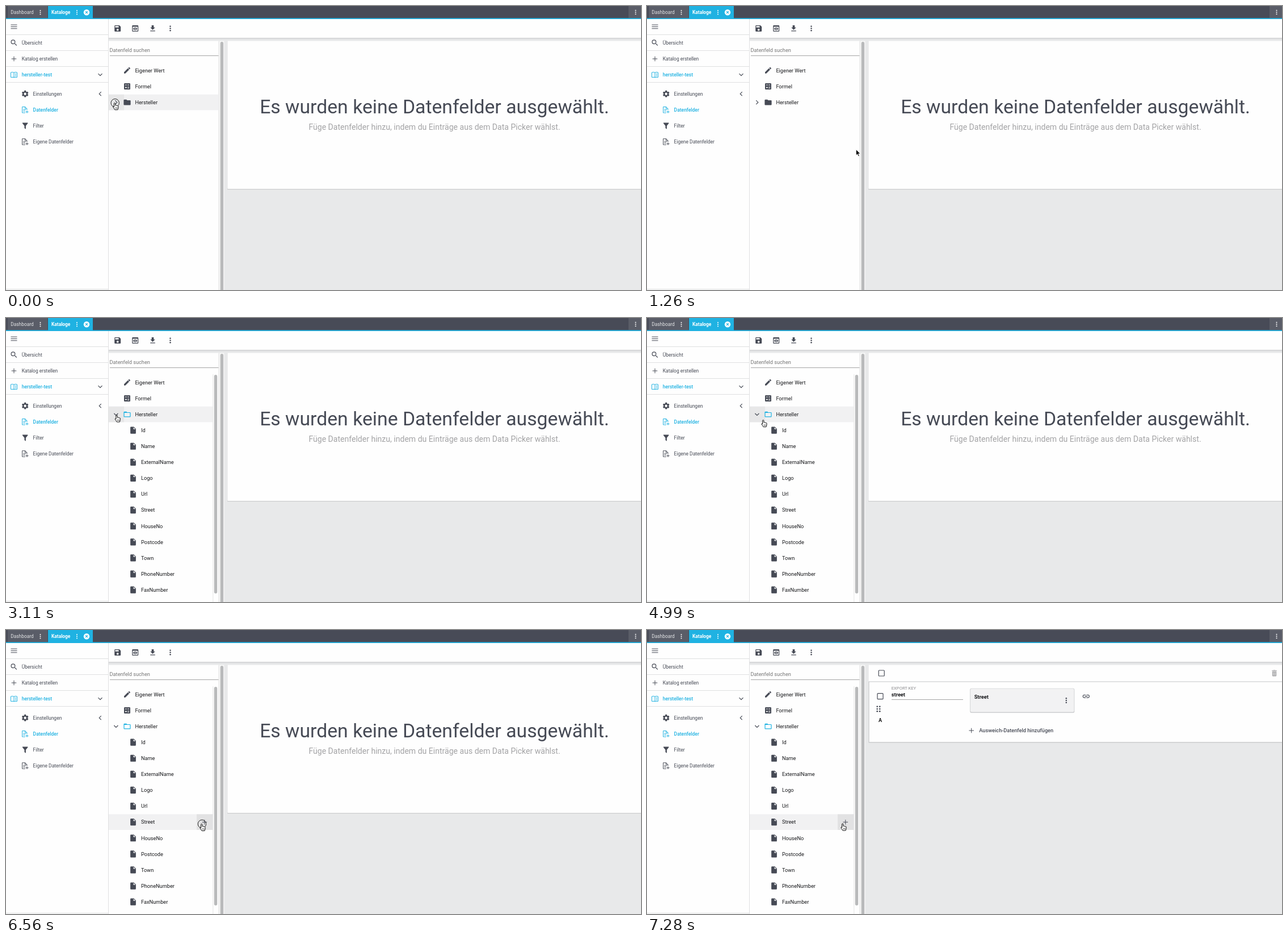
Animation of 1119 by 500 pixels, one loop 8000 ms. Source, as an HTML page:

```html
<!DOCTYPE html>
<html lang="de">
<head>
<meta charset="utf-8">
<title>Datenfelder</title>
<style>
html, body { margin: 0; width: 100%; height: 100%; overflow: hidden; background: #e8e9ea; }
svg { display: block; width: 100vw; height: 100vh; font-family: Roboto, sans-serif; }
</style>
</head>
<body>
<svg id="stage" viewBox="0 0 1119 500"></svg>
<script>
const LOOP = 8000;
const DARK = '#464a55', CYAN = '#1fb2e2', LINE = '#dfe0e1', INK = '#16171a';
const ROW_TOP = 99.3, PITCH = 28.1;
const LEAVES = ['Id', 'Name', 'ExternalName', 'Logo', 'Url', 'Street', 'HouseNo',
  'Postcode', 'Town', 'PhoneNumber', 'FaxNumber'];

// Glyphs on a 24-unit grid
const GLYPH = {
  save: 'M17 3H5a2 2 0 0 0-2 2v14a2 2 0 0 0 2 2h14a2 2 0 0 0 2-2V7zM12 19a3 3 0 1 1 0-6 3 3 0 0 1 0 6zM15 9H5V5h10z',
  preview: 'M19 3H5a2 2 0 0 0-2 2v14a2 2 0 0 0 2 2h14a2 2 0 0 0 2-2V5a2 2 0 0 0-2-2zm0 16H5V7h14zM12 9c-2.73 0-5.06 1.66-6 4 .94 2.34 3.27 4 6 4s5.06-1.66 6-4c-.94-2.34-3.27-4-6-4zm0 6.5a2.5 2.5 0 0 1 0-5 2.5 2.5 0 0 1 0 5zm0-1a1.5 1.5 0 0 0 0-3 1.5 1.5 0 0 0 0 3z',
  download: 'M19 9h-4V3H9v6H5l7 7zM5 18v2h14v-2z',
  search: 'M15.5 14h-.79l-.28-.27A6.47 6.47 0 0 0 16 9.5 6.5 6.5 0 1 0 9.5 16c1.61 0 3.09-.59 4.23-1.57l.27.28v.79l5 4.99L20.49 19zm-6 0a4.5 4.5 0 1 1 0-9 4.5 4.5 0 0 1 0 9z',
  plus: 'M19 12.8h-6.2V19h-1.6v-6.2H5v-1.6h6.2V5h1.6v6.2H19z',
  gear: 'M19.14 12.94a7 7 0 0 0 0-1.88l2.03-1.58a.5.5 0 0 0 .12-.61l-1.92-3.32a.5.5 0 0 0-.59-.22l-2.39.96a7 7 0 0 0-1.62-.94l-.36-2.54a.5.5 0 0 0-.48-.41h-3.84a.5.5 0 0 0-.47.41l-.36 2.54a7 7 0 0 0-1.62.94l-2.39-.96a.5.5 0 0 0-.59.22L2.74 8.87a.5.5 0 0 0 .12.61l2.03 1.58a7 7 0 0 0 0 1.88l-2.03 1.58a.5.5 0 0 0-.12.61l1.92 3.32c.12.22.37.29.59.22l2.39-.96a7 7 0 0 0 1.62.94l.36 2.54c.05.24.24.41.48.41h3.84c.24 0 .44-.17.47-.41l.36-2.54a7 7 0 0 0 1.62-.94l2.39.96c.22.08.47 0 .59-.22l1.92-3.32a.5.5 0 0 0-.12-.61zM12 15.6a3.6 3.6 0 1 1 0-7.2 3.6 3.6 0 0 1 0 7.2z',
  filter: 'M14 12v7.9a1 1 0 0 1-1.7.8l-2-2a1 1 0 0 1-.3-.8V12L4.2 4.6A1 1 0 0 1 5 3h14a1 1 0 0 1 .8 1.6z',
  pencil: 'M20.7 7c.4-.4.4-1 0-1.4l-2.3-2.3a1 1 0 0 0-1.4 0l-1.9 1.8 3.8 3.8zM3 17.25V21h3.75L17.8 9.93l-3.75-3.75z',
  formula: 'M5 3h14a2 2 0 0 1 2 2v14a2 2 0 0 1-2 2H5a2 2 0 0 1-2-2V5a2 2 0 0 1 2-2zM6 7.2v1.6h5V7.2zM13 7.2v1.6h5V7.2zM13 13.2v1.5h5v-1.5zM13 16.2v1.5h5v-1.5zM7.7 13v1.7H6v1.5h1.7V18h1.6v-1.8H11v-1.5H9.3V13z',
  folder: 'M10 4H4a2 2 0 0 0-2 2v12a2 2 0 0 0 2 2h16a2 2 0 0 0 2-2V8a2 2 0 0 0-2-2h-8z',
  file: 'M13 9V3.5L18.5 9zM6 2a2 2 0 0 0-2 2v16a2 2 0 0 0 2 2h12a2 2 0 0 0 2-2V8l-6-6z',
  link: 'M3.9 12A3.1 3.1 0 0 1 7 8.9h4V7H7a5 5 0 0 0 0 10h4v-1.9H7A3.1 3.1 0 0 1 3.9 12zM8 13h8v-2H8zM17 7h-4v1.9h4a3.1 3.1 0 0 1 0 6.2h-4V17h4a5 5 0 0 0 0-10z',
  trash: 'M6 19a2 2 0 0 0 2 2h8a2 2 0 0 0 2-2V7H6zM9 9h1.3v9.5H9zM13.7 9H15v9.5h-1.3zM19 4h-3.5l-1-1h-5l-1 1H5v2h14z'
};
GLYPH.folderOpen = GLYPH.folder + 'M20 18H4V8h16z';

const rect = (x, y, w, h, fill, more = '') =>
  `<rect x="${x}" y="${y}" width="${w}" height="${h}" fill="${fill}" ${more}/>`;
const stroke = (d, color = DARK, width = 1) =>
  `<path d="${d}" fill="none" stroke="${color}" stroke-width="${width}"/>`;
const icon = (name, cx, cy, color = DARK, s = .61) =>
  `<path d="${GLYPH[name]}" fill="${color}" fill-rule="evenodd" transform="translate(${cx} ${cy}) scale(${s}) translate(-12 -12)"/>`;
const text = (s, x, cy, size, color = DARK, weight = 400, more = '') =>
  `<text x="${x}" y="${cy + size * .355}" font-size="${size}" fill="${color}" font-weight="${weight}" ${more}>${s}</text>`;
const dots = (cx, cy, color = DARK, gap = 3.7, r = 1.15) =>
  [-gap, 0, gap].map(d => `<circle cx="${cx}" cy="${cy + d}" r="${r}" fill="${color}"/>`).join('');
const group = (id, body) => `<g id="${id}">${body}</g>`;
const rowY = i => ROW_TOP + PITCH * (i + .5);

const documentPlus = (cy, color) => stroke(
  `M36.9 ${cy + .3}V${cy - 2.2}L33.7 ${cy - 5.3}H28.6V${cy + 5.2}H34M33.5 ${cy - 5.2}V${cy - 2}H36.8` +
  `M30.2 ${cy - .2}H35M30.2 ${cy + 2.2}H33.8M37 ${cy + 1.2}V${cy + 6}M34.6 ${cy + 3.6}H39.6`, color, .95);
const checkbox = (cx, cy) =>
  rect(cx - 5, cy - 5, 10, 10, 'none', `rx="1" stroke="${DARK}" stroke-width="1.2"`);

function topBar() {
  return rect(0, 0, 1119, 22, '#484b57') + rect(3, 0, 70, 21, '#5a5d68') +
    rect(74, 0, 79, 22, CYAN) + rect(1097, 0, 22, 21, '#5a5d68') + rect(0, 21.3, 1119, 1.7, CYAN) +
    text('Dashboard', 8.2, 11, 8.4, '#e3e4e6') + dots(60.5, 11.2, '#fff', 3.3, 1) +
    text('Kataloge', 80, 11, 8.4, '#fff', 700) + dots(125, 11.2, '#fff', 3.3, 1) +
    '<circle cx="142" cy="11.2" r="5.2" fill="#fff"/>' +
    stroke('M140 9.2l4 4m0-4l-4 4', CYAN, 1.2) + dots(1109.5, 11, '#fff', 3.3, 1);
}

function sidebar() {
  const rules = [50.5, 78.5, 106.5, 134.5, 498.5].map(y => stroke(`M0 ${y}H180`, LINE)).join('');
  return rect(0, 23, 180, 477, '#fefefe') + rules + stroke('M180.5 23V500', LINE) +
    stroke('M8.5 33.2H19.5M8.5 36.5H19.5M8.5 39.8H19.5', DARK, 1.1) +
    icon('search', 14, 64.7) + text('Übersicht', 27.7, 64.7, 8.5) +
    icon('plus', 14, 93) + text('Katalog erstellen', 27.7, 93, 8.5) +
    stroke('M14 117.2V126.3M14 117.2Q11 115.8 8.5 117V125.5H19.5V117Q17 115.8 14 117.2M16 119.2h1.8M16 121.2h1.8M16 123.2h1.8', CYAN, .95) +
    text('hersteller-test', 27.7, 121, 8.5, CYAN, 500) +
    stroke('M162.5 119.2L166 122.7L169.5 119.2', DARK, 1.2) +
    icon('gear', 33.7, 154.7) + text('Einstellungen', 47.6, 154.7, 8.5) +
    stroke('M167.7 151.2L164.3 154.7L167.7 158.2', DARK, 1.2) +
    documentPlus(182.8, CYAN) + text('Datenfelder', 47.6, 182.8, 8.5, CYAN, 500) +
    icon('filter', 33.7, 211) + text('Filter', 47.6, 211, 8.5) +
    documentPlus(239, DARK) + text('Eigene Datenfelder', 47.6, 239, 8.5);
}

function toolbar() {
  return rect(181, 56, 938, 1.2, '#cfd0d2') + rect(181, 57.2, 938, 1.5, '#dddee0') +
    rect(181, 23, 938, 33, '#fefefe') +
    icon('save', 196.7, 39.5) + icon('preview', 227.7, 39.5) +
    icon('download', 258.5, 39.5) + dots(289.5, 39.5, DARK, 3.8, 1.25);
}

function tree() {
  const leaf = (name, i) => icon('file', 224, rowY(i + 3)) + text(name, 238, rowY(i + 3), 9.2, INK);
  return rect(181, 61.5, 194, 439, '#fefefe') + rect(375.5, 61.5, 9, 439, '#f7f7f7') +
    stroke('M375 61.5V500', '#e3e3e3') + rect(377.7, 63, 5.4, 445, '#b9babb', 'rx="2.7"') +
    text('Datenfeld suchen', 182.6, 78.2, 9.2, '#777') + stroke('M183 87.5H374.5', '#a5a5a5') +
    rect(181, 0, 194, PITCH - .5, '#f1f1f2', 'id="hover"') + rect(181, 0, 27, PITCH - .5, '#e7e7e8', 'id="toggle"') +
    rect(336, 0, 28.5, PITCH - .5, '#e2e2e3', 'id="add"') +
    icon('pencil', 213.5, rowY(0)) + text('Eigener Wert', 227.4, rowY(0), 9.2, INK) +
    icon('formula', 213.5, rowY(1)) + text('Formel', 227.4, rowY(1), 9.2, INK) +
    text('Hersteller', 227.4, rowY(2), 9.2, INK) +
    group('closed', icon('folder', 213.5, rowY(2)) + stroke('M192.3 166.2L195.8 169.7L192.3 173.2', DARK, 1.2)) +
    group('open', icon('folderOpen', 213.5, rowY(2), CYAN) + stroke('M190.4 168L193.9 171.5L197.4 168', DARK, 1.2) +
      LEAVES.map(leaf).join('') + stroke('M364.8 99V500', '#e6e6e6') +
      rect(366.8, 100, 5.4, 385, '#b9babb', 'rx="2.7"')) +
    group('plus', icon('plus', 349.8, 0));
}

function content() {
  const grip = [405.7, 410.2].map(x => dots(x, 139, DARK, 4.2, 1.35)).join('');
  return group('empty', rect(390, 321.5, 729, 1.7, '#cbccce') + rect(390.7, 61.5, 729, 260.5, '#fefefe') +
      text('Es wurden keine Datenfelder ausgewählt.', 755, 177.5, 33.75, DARK, 400, 'text-anchor="middle"') +
      text('Füge Datenfelder hinzu, indem du Einträge aus dem Data Picker wählst.', 755, 213, 14.05, '#a3a3a5', 400, 'text-anchor="middle"')) +
    group('filled', rect(390.7, 61.5, 729, 136, '#fefefe') +
      stroke('M1119 91H391V197.8H1119', '#c6c7c9', 1.2) +
      checkbox(413.2, 76) + icon('trash', 1105.5, 76, '#a9a9ab') +
      checkbox(411, 116.7) + grip + text('A', 408, 158.8, 9, '#111', 700) +
      text('EXPORT KEY', 430.8, 102.8, 7.6, '#8c8c8e') + text('street', 430.8, 113.5, 9.2, INK, 700) +
      stroke('M431 122.5H557', '#a5a5a5') +
      rect(569.3, 102.8, 184, 43, '#c4c5c7', 'rx="2.5"') + rect(570, 103.3, 182.6, 41.3, '#f2f2f3', 'rx="2"') +
      text('Street', 576.7, 117.5, 9.2, INK, 700) + dots(738.8, 124, DARK, 3.8, 1.25) +
      icon('link', 773.8, 116.7) + icon('plus', 571.7, 177) +
      text('Ausweich-Datenfeld hinzufügen', 585.3, 177, 9.2, DARK, 500));
}

function pointer() {
  return '<circle id="click" r="7.2" fill="none" stroke="#222" stroke-width="1"/>' +
    group('hand', '<path d="M-1.1 7V1a1.1 1.1 0 0 1 2.2 0v3.3a1 1 0 0 1 1.8.4a1 1 0 0 1 1.7.5a.95.95 0 0 1 1.7.8V8.6L5.3 12H.3C-.4 10.2-2 8.8-2.8 7.2C-3.1 6.1-1.8 5.7-1.1 7Z" fill="#fff" stroke="#000" stroke-width=".95" stroke-linejoin="round"/>' +
      stroke('M1.4 7.8v2.3M2.9 7.8v2.3M4.4 7.8v2.3', '#000', .6)) +
    group('arrow', '<path d="M0 0V10.2L2.3 8L3.9 11.8L5.6 11.1L4 7.4H7.2Z" fill="#000" stroke="#fff" stroke-width=".7"/>');
}

document.getElementById('stage').innerHTML =
  rect(0, 0, 1119, 500, '#e8e9ea') + topBar() + sidebar() + toolbar() + tree() + content() + pointer();

// Pointer moves: first step, last step, number of steps, end x, end y
const MOVES = [
  [80, 640, 7, 304, 296],
  [820, 990, 3, 369.5, 253.5],
  [1260, 1260, 1, 368.5, 252.7],
  [1350, 1350, 1, 367, 254.5],
  [1520, 2320, 10, 195, 171],
  [4990, 4990, 1, 204.7, 179.7],
  [5080, 5690, 8, 279, 341],
  [5960, 6130, 3, 330, 344],
  [6215, 6300, 2, 344.7, 341.5],
  [7280, 7280, 1, 344.7, 341]
];
const START = { x: 191.5, y: 170.7 };
const CLICKS = [[0, 80], [2850, 3030], [6560, 6740]];

const ease = p => p * p * (3 - 2 * p);

function pointerAt(t) {
  let { x, y } = START;
  for (const [from, to, steps, endX, endY] of MOVES) {
    if (t < from) break;
    const gap = steps > 1 ? (to - from) / (steps - 1) : 1;
    const done = Math.min(steps, Math.floor((t - from) / gap + 1e-6) + 1);
    const p = ease(done / steps);
    x += (endX - x) * p;
    y += (endY - y) * p;
  }
  return { x, y };
}

const el = id => document.getElementById(id);
const show = (id, on) => el(id).style.display = on ? '' : 'none';
const move = (id, x, y) => el(id).setAttribute('transform', `translate(${x} ${y})`);

function draw(t) {
  const { x, y } = pointerAt(t);
  const open = t >= 2940, filled = t >= 6740;
  const row = Math.floor((y - ROW_TOP) / PITCH);
  const over = row >= 0 && row < (open ? 3 + LEAVES.length : 3);
  const leaf = over && row > 2;
  const top = ROW_TOP + PITCH * row + .3;

  show('closed', !open);
  show('open', open);
  show('empty', !filled);
  show('filled', filled);

  show('hover', over);
  show('toggle', row === 2 && x < 208);
  show('add', leaf && x > 336);
  show('plus', leaf);
  for (const id of ['hover', 'toggle', 'add']) el(id).setAttribute('y', top);
  el('hover').setAttribute('width', open ? 183.5 : 194);
  el('add').setAttribute('fill', filled && t < 7280 ? '#d8d8d9' : '#e2e2e3');
  move('plus', 0, rowY(row));

  show('hand', over);
  show('arrow', !over);
  show('click', CLICKS.some(([on, off]) => t >= on && t < off));
  move('hand', x, y);
  move('arrow', x, y);
  move('click', x + .7, y);
}

function tick() {
  draw(performance.now() % LOOP);
  requestAnimationFrame(tick);
}
tick();
</script>
</body>
</html>
```
